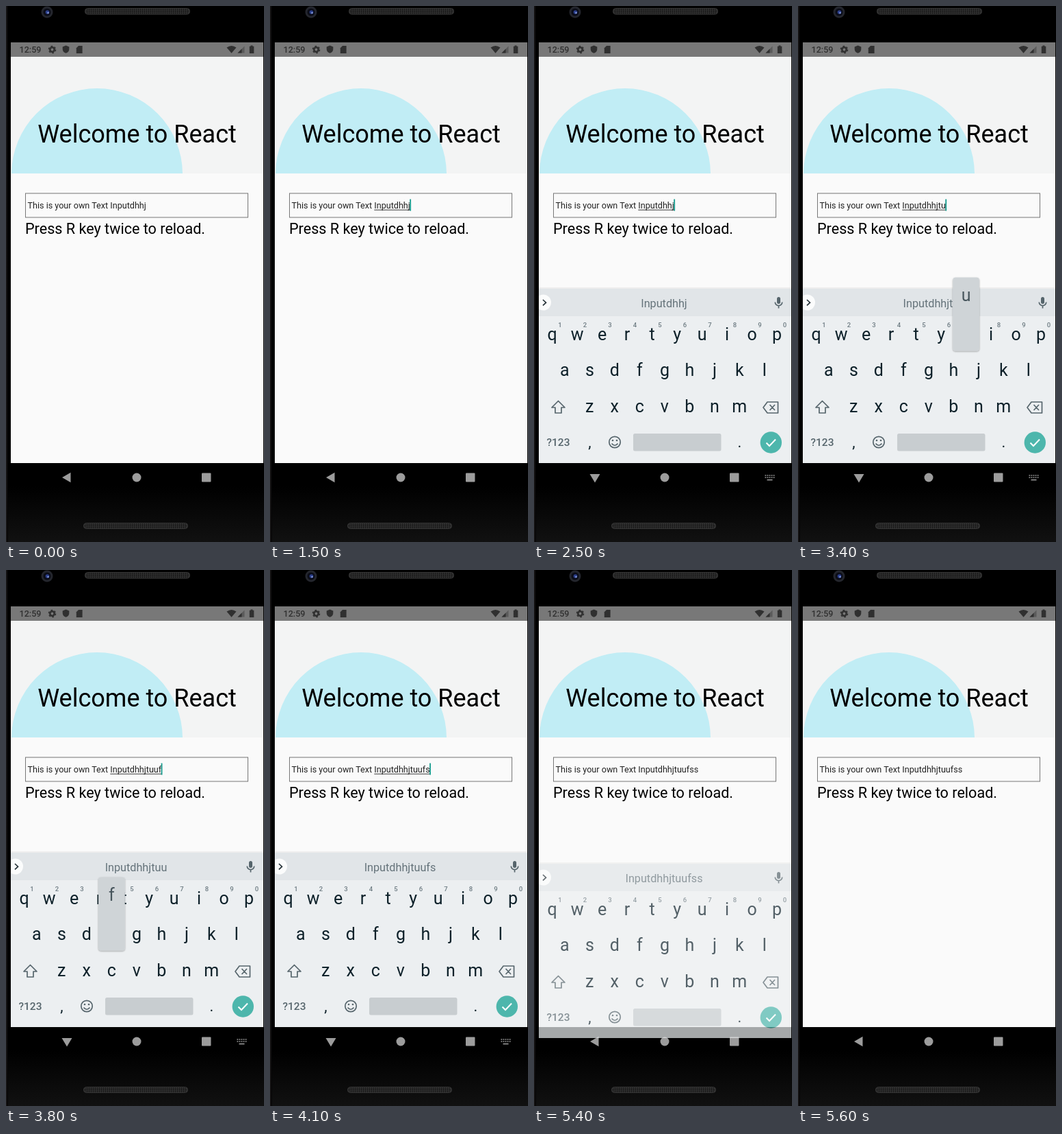
These frames come from a looping animation (377 by 781 pixels, 6700 ms). An HTML page:

```html
<!DOCTYPE html>
<html lang="en">
<head>
<meta charset="utf-8">
<title>Text input demo</title>
<style>
  html, body { margin: 0; width: 100%; height: 100%; overflow: hidden; background: #000; }
  svg { display: block; width: 100%; height: 100%; font-family: Roboto, sans-serif; }
  text { white-space: pre; }
  .mid { text-anchor: middle; }
  .line { fill: none; stroke: #56656c; stroke-width: 1.7; stroke-linejoin: round; }
</style>
</head>
<body>
<svg viewBox="0 0 377 781">
  <defs>
    <linearGradient id="base" x1="0" y1="0" x2="0" y2="1">
      <stop offset="0" stop-color="#000"/><stop offset="1" stop-color="#111"/>
    </linearGradient>
    <linearGradient id="edge">
      <stop offset="0" stop-color="#1d1b1c"/><stop offset="1" stop-color="#000"/>
    </linearGradient>
    <pattern id="mesh" width="3" height="3" patternUnits="userSpaceOnUse">
      <rect width="3" height="3" fill="#303030"/>
      <circle cx="1.5" cy="1.5" r=".9" fill="#0d0d0d"/>
    </pattern>
    <clipPath id="header"><rect x="7" y="74" width="369" height="170"/></clipPath>
    <clipPath id="panel"><rect x="7" y="409" width="369" height="257"/></clipPath>
    <filter id="shade" x="-20%" y="-10%" width="140%" height="120%">
      <feDropShadow dx="0" dy="1" stdDeviation="1.2" flood-opacity=".35"/>
    </filter>
  </defs>

  <!-- phone body -->
  <rect width="377" height="781"/>
  <rect y="700" width="377" height="81" fill="url(#base)"/>
  <rect width="3" height="781" fill="url(#edge)"/>
  <circle cx="60" cy="9" r="8.5" fill="#24262d"/>
  <circle cx="60" cy="9" r="5.5" fill="#0b0d18"/>
  <circle cx="60.5" cy="9" r="2.8" fill="#2b3f8c"/>
  <circle cx="61.5" cy="10" r="1.2" fill="#91a4e0"/>
  <g fill="url(#mesh)" stroke="#3b3b3b">
    <rect x="115.5" y="3.5" width="153" height="8.5" rx="4"/>
    <rect x="113.5" y="753.5" width="152" height="8" rx="4"/>
  </g>

  <!-- app screen -->
  <rect x="7" y="53" width="369" height="613" fill="#fafafa"/>
  <rect x="7" y="74" width="369" height="170" fill="#f3f4f4"/>
  <circle cx="133" cy="245" r="125" fill="#c1edf5" clip-path="url(#header)"/>
  <rect x="7" y="53" width="369" height="21" fill="#787878"/>
  <g fill="#303030">
    <text x="19.5" y="68" font-size="12.6" font-weight="500">12:59</text>
    <circle cx="67.5" cy="63.5" r="3.2" fill="none" stroke="#303030" stroke-width="2.6"/>
    <circle cx="67.5" cy="63.5" r="5" fill="none" stroke="#303030" stroke-width="1.6" stroke-dasharray="2.6 2.636"/>
    <path d="M87.5 57.5l4.8 2.1v3.2q0 4.3-4.8 6-4.8-1.7-4.8-6v-3.2z"/>
    <path d="M106 58h5.6v11h-8.8v-7.800z"/>
    <path d="M322.500 60.500q7-5 14 0l-7 8.300z"/>
    <path d="M338.500 68.500h10v-10z" fill-opacity=".4"/>
    <path d="M338.500 68.500h6v-6z"/>
    <path d="M357.500 57.500h3v1.200h1.800v10.300h-6.500v-10.300h1.700z"/>
  </g>
  <text class="mid" x="191.500" y="198.500" font-size="36">Welcome to React</text>
  <rect x="28.500" y="273" width="325" height="35" fill="none" stroke="#777"/>
  <text id="field" x="31.500" y="295" font-size="12.600" fill="#222"></text>
  <rect id="under" y="296.700" height=".9" fill="#222"/>
  <rect id="caret" y="281.500" width="1.800" height="17" fill="#159b8d"/>
  <text x="28" y="331.500" font-size="21.600">Press R key twice to reload.</text>

  <!-- navigation bar -->
  <g fill="#9c9c9c">
    <path id="back" d="M82 687l12.500-7.200v14.400z"/>
    <path id="hide" d="M81.500 682h15l-7.500 12.500z"/>
    <circle cx="191" cy="687" r="6.500"/>
    <rect x="286" y="680.500" width="13.500" height="13" rx="1"/>
    <g id="switcher" fill="none" stroke="#9c9c9c" stroke-width="1.600">
      <path d="M337.500 684h14M337.500 687h14" stroke-dasharray="1.800 1.250"/>
      <path d="M340.500 690.500h8"/>
    </g>
  </g>

  <g id="board">
    <rect x="7" y="410" width="369" height="2" fill="#000" opacity=".05"/>
    <rect x="7" y="412" width="369" height="254" fill="#eceff1"/>
    <rect x="7" y="412" width="369" height="40" fill="#e1e5e8"/>
    <g clip-path="url(#panel)"><circle cx="13.500" cy="432" r="11.500" fill="#fbfcfc"/></g>
    <path d="M13 428l4.500 4.200-4.500 4.200" fill="none" stroke="#263238" stroke-width="1.700"/>
    <text id="hint" class="mid" x="190" y="438.500" font-size="16.200" fill="#65737a"></text>
    <rect x="355" y="424" width="5" height="10" rx="2.500" fill="#56656c"/>
    <path class="line" d="M352.300 431.500a5.200 5.200 0 0 0 10.400 0M357.500 437v3.500"/>
    <g id="keys"></g>
    <path class="line" d="M35.500 575.500l9.500 9.500h-5v8h-9v-8h-5z"/>
    <path class="line" d="M341 577h15.500v16h-15.500l-6-8zM344.500 581l7.500 8M352 581l-7.500 8"/>
    <text class="mid" x="35.500" y="641" font-size="15.500" font-weight="500" fill="#56656c">?123</text>
    <circle class="line" cx="118" cy="635.500" r="8.200"/>
    <path class="line" d="M113.500 637.500q4.500 5.500 9 0"/>
    <g fill="#56656c"><circle cx="115" cy="633" r="1.300"/><circle cx="121" cy="633" r="1.300"/></g>
    <rect x="145" y="623" width="128.500" height="25.500" rx="2.500" fill="#c8cdd0"/>
    <circle cx="346.300" cy="636" r="15.700" fill="#4db6ac"/>
    <path d="M339.500 636.500l4.500 4.500 9-9.500" fill="none" stroke="#fff" stroke-width="2"/>
    <g id="popup">
      <rect x="-19.300" y="-91" width="38.600" height="107" rx="4" fill="#cfd4d7" filter="url(#shade)"/>
      <text id="pressed" class="mid" y="-57" font-size="25" fill="#47555c"></text>
    </g>
  </g>
</svg>
<script>
const $ = id => document.getElementById(id);
const LOOP = 6700, LEAD = 'This is your own Text ', WORD = 'Inputdhhj', ADDED = 'tuufss';

// keyboard layout: letters, centre of the first key, baseline
const ROWS = [['qwertyuiop', 26.6, 486.5], ['asdfghjkl', 44.9, 538.5], ['zxcvbnm', 81.3, 592]];
const PITCH = 36.5, keyPos = {};

function label(str, x, y, size, fill, weight = 400) {
  const el = document.createElementNS('http://www.w3.org/2000/svg', 'text');
  const attrs = { class: 'mid', x, y, fill, 'font-size': size, 'font-weight': weight };
  for (const name in attrs) el.setAttribute(name, attrs[name]);
  el.textContent = str;
  $('keys').append(el);
}

ROWS.forEach(([letters, x0, y], row) => [...letters].forEach((ch, i) => {
  const x = x0 + i * PITCH;
  keyPos[ch] = [x, y];
  label(ch, x, y, 25, '#0d2029');
  if (row === 0) label((i + 1) % 10, x + 11.3, y - 18.5, 9.5, '#6d7b82', 500);
}));
label(',', 81.5, 643, 22, '#0d2029');
label('.', 300.5, 643, 22, '#0d2029');

// time, letters typed, letters in the suggestion, pressed key
const TYPING = [
  [0, 0, 0, ''], [3100, 1, 0, 't'], [3200, 1, 1, 't'], [3300, 1, 1, ''],
  [3400, 2, 1, 'u'], [3500, 2, 2, ''], [3600, 3, 2, 'u'], [3800, 4, 3, 'f'],
  [4000, 5, 4, 's'], [4100, 5, 5, ''], [4200, 6, 5, 's'], [4300, 6, 6, '']
];
// time, keyboard offset, opacity
const SLIDE = [
  [0, 0, 0], [1700, 27, .2], [1800, 13, .6], [1900, 4, .9], [2000, 0, 1],
  [5300, 4, .92], [5400, 16, .7], [5500, 29, .28], [5600, 0, 0]
];
const CARET = [[1500, 2000], [2500, 2900], [3100, 4600], [5100, 5300]];

const at = (steps, t) => steps.findLast(s => s[0] <= t);
const within = (t, [from, to]) => t >= from && t < to;
const show = (id, on) => $(id).setAttribute('visibility', on ? 'inherit' : 'hidden');

function draw(t) {
  const [, typed, hinted, key] = at(TYPING, t);
  const [, dy, alpha] = at(SLIDE, t);
  const field = $('field');
  field.textContent = LEAD + WORD + ADDED.slice(0, typed);
  $('hint').textContent = WORD + ADDED.slice(0, hinted);

  const left = 31.5 + field.getSubStringLength(0, LEAD.length);
  const right = 31.5 + field.getComputedTextLength();
  $('under').setAttribute('x', left);
  $('under').setAttribute('width', right - left);
  $('caret').setAttribute('x', right - .5);
  show('under', within(t, [1500, 5300]));
  show('caret', CARET.some(span => within(t, span)));

  $('board').setAttribute('transform', `translate(0 ${dy})`);
  $('board').setAttribute('opacity', alpha);
  show('popup', key);
  if (key) {
    $('popup').setAttribute('transform', `translate(${keyPos[key]})`);
    $('pressed').textContent = key;
  }

  const open = within(t, [1700, 5300]);
  show('back', !open);
  show('hide', open);
  show('switcher', open);
}

const start = performance.now();
function tick() {
  draw((performance.now() - start) % LOOP);
  requestAnimationFrame(tick);
}
tick();
</script>
</body>
</html>
```
